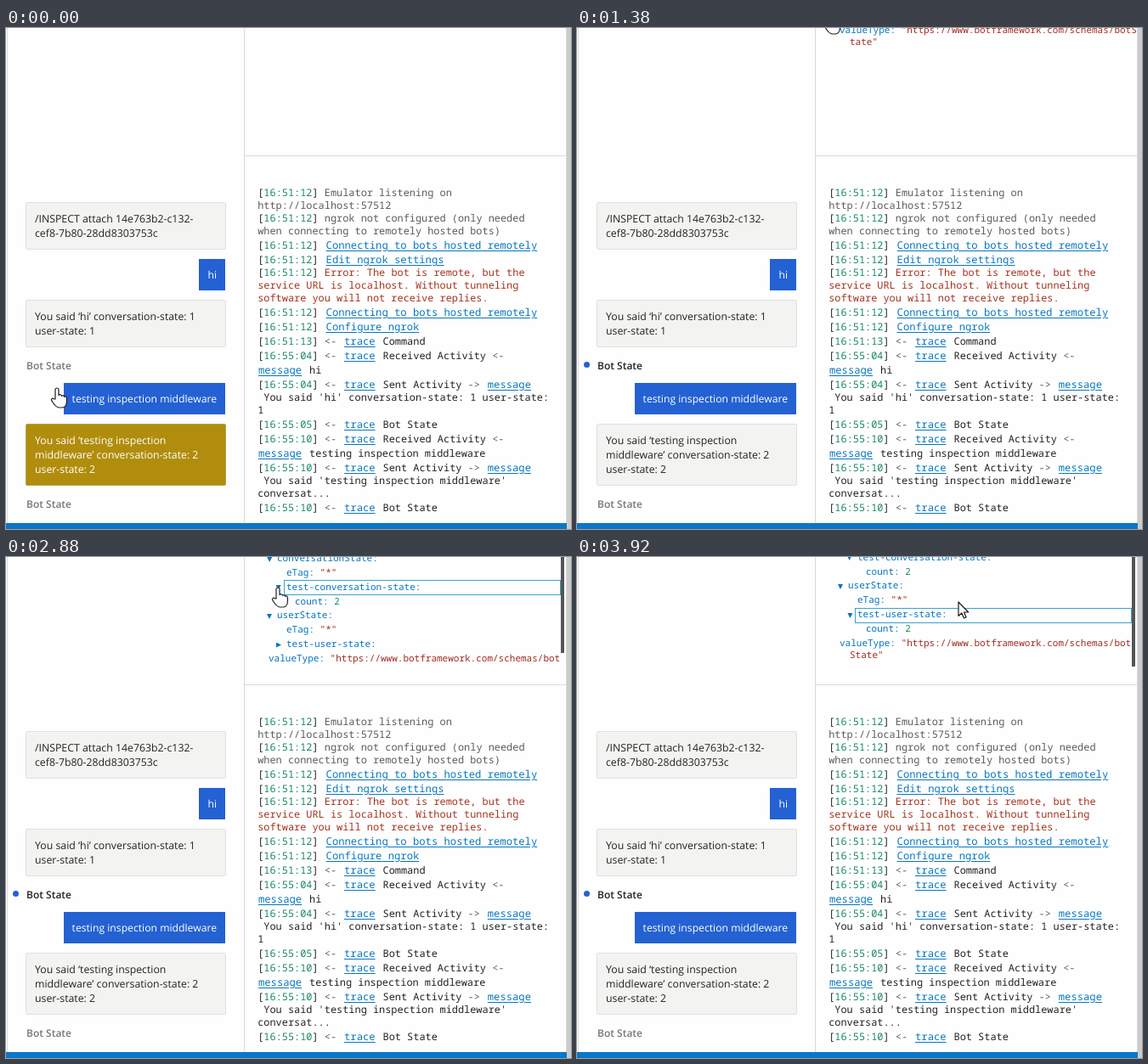
Recreate the animation shown at these times as an HTML page. Size 665 px wide and 590 px high, loop 3970 ms.

```html
<!DOCTYPE html>
<html lang="en">
<head>
<meta charset="utf-8">
<title>Bot inspector</title>
<style>
* { box-sizing: border-box; margin: 0; }
html, body { width: 100%; height: 100%; overflow: hidden; background: #fefefe; }
body {
  --loop: 3.97s step-end infinite;
  --line: #dadada; --ink: #222; --dim: #5c5c5c; --bubble: #f3f3f1;
  --accent: #2461d2; --key: #0574bd; --number: #178a60; --string: #a32a20;
}
#stage {
  position: relative; width: 665px; height: 590px; overflow: hidden;
  background: #fefefe; text-rendering: geometricPrecision;
}
#stage > * { position: absolute; }

/* frame */
.v { width: 1px; top: 0; height: 583px; background: var(--line); }
.h { left: 281px; top: 150px; width: 379px; height: 1px; background: var(--line); }
.edge { left: 660px; top: 0; width: 5px; height: 590px; background: #cbcbcb; }
.bar { left: 0; top: 583px; width: 660px; height: 7px; background: #0877c8; }

/* chat */
.msg, .state { font: 12.3px/17px "Open Sans", "Noto Sans", sans-serif; white-space: pre; color: var(--ink); }
.msg { left: 23px; width: 236px; padding: 10px; border: 1px solid #e0e0e0; border-radius: 2px; background: var(--bubble); }
.me { left: auto; right: 407px; width: auto; color: #fff; background: var(--accent); border: 0; border-radius: 0; font-size: 12.2px; font-weight: 500; }
.gold { animation: gold var(--loop); }
.state { left: 17px; width: 66px; height: 22px; padding: 2px 6px; border: 1px solid transparent; font-size: 12px; font-weight: 600; color: #777; }
.picked { animation: pick var(--loop); }
.dot { left: 8px; top: 393px; width: 7px; height: 7px; border-radius: 50%; background: var(--accent); animation: dot var(--loop); }
@keyframes gold {
  0% { background: #b08d0c; border-color: #b9a04a; color: #fff; }
  11.8%, 100% { background: var(--bubble); border-color: #e0e0e0; color: var(--ink); }
}
@keyframes pick {
  0% { color: #777; border-color: transparent; }
  11.8% { color: var(--ink); border-color: #3aa3cc; }
  31.5%, 100% { color: var(--ink); border-color: transparent; }
}
@keyframes dot { 0% { opacity: 0; } 11.8%, 100% { opacity: 1; } }

/* log */
#log { left: 296.2px; top: 187px; font: 11.92px "Noto Sans Mono", "DejaVu Sans Mono", monospace; color: var(--ink); }
#log p { height: 15px; line-height: 15px; white-space: pre; }
#log p:has(u) { height: 17px; line-height: 17px; }
#log u { font-size: 12.2px; margin: 0 1.8px; color: #0877c0; text-underline-offset: 1.5px; }
#log u:first-child { margin-left: .8px; }
#log b { font-weight: 400; color: var(--number); }
#log s, #log .dim { text-decoration: none; color: var(--dim); }
#log .err { color: #a53420; }

/* property tree */
#panel { left: 281px; top: 0; width: 378px; height: 129px; overflow: hidden; font: 11px/16.8px "Noto Sans Mono", "DejaVu Sans Mono", monospace; color: var(--key); }
#tree { position: absolute; left: 0; top: -5.8px; width: 381px; white-space: pre; animation: appear var(--loop), scroll var(--loop); }
.row { position: relative; height: 16.8px; margin-left: 38px; }
.leaf { margin-left: 49px; }
.deep { margin-left: 59px; }
.row i { position: absolute; left: -12px; top: 5.6px; width: 6px; height: 6px; background: var(--key); clip-path: polygon(0 0, 100% 50%, 0 100%); transform: rotate(var(--turn)); }
.kids { max-height: var(--room); overflow: hidden; }
.node { --room: 200px; --turn: 90deg; }
.value { animation: value var(--loop); }
.user { animation: user var(--loop); }
.conv { animation: conv var(--loop); }
.tconv { animation: tconv var(--loop); }
.tuser { animation: tuser var(--loop); }
.type { padding-left: 40px; text-indent: -12px; line-height: 14px; padding-top: 1.4px; white-space: pre-wrap; word-break: break-all; animation: wrap var(--loop); }
#tree em { font-style: normal; color: var(--string); }
#tree b { font-weight: 400; color: var(--number); }
.focus { position: absolute; height: 18px; border: 1px solid #3aa3cc; animation: focus var(--loop); }
.thumb { position: absolute; left: 372px; top: 0; width: 4px; background: #555; animation: thumb var(--loop); }
@keyframes appear { 0% { opacity: 0; } 11.8%, 100% { opacity: 1; } }
@keyframes value { 0% { --room: 0px; --turn: 0deg; } 37.8%, 100% { --room: 200px; --turn: 90deg; } }
@keyframes user { 0% { --room: 0px; --turn: 0deg; } 47.9%, 100% { --room: 200px; --turn: 90deg; } }
@keyframes conv { 0% { --room: 0px; --turn: 0deg; } 56.4%, 100% { --room: 200px; --turn: 90deg; } }
@keyframes tconv { 0% { --room: 0px; --turn: 0deg; } 68%, 100% { --room: 200px; --turn: 90deg; } }
@keyframes tuser { 0% { --room: 0px; --turn: 0deg; } 79.6%, 100% { --room: 200px; --turn: 90deg; } }
@keyframes wrap { 0% { padding-right: 0; } 56.4%, 100% { padding-right: 7px; } }
@keyframes focus {
  0% { left: 36px; top: -40px; width: 342px; }
  47.9% { left: 36px; top: 15.8px; width: 342px; }
  56.4% { left: 36px; top: -1.2px; width: 336px; }
  68% { left: 46px; top: 32.8px; width: 326px; }
  79.6%, 100% { left: 46px; top: 100.8px; width: 326px; }
}
@keyframes scroll {
  0% { transform: none; }
  91% { transform: none; animation-timing-function: ease-in-out; }
  95%, 100% { transform: translateY(-35px); }
}
@keyframes thumb {
  0% { height: 0; }
  56.4% { height: 129px; }
  68% { height: 113px; }
  79.6% { height: 98px; }
  91% { height: 98px; animation-timing-function: ease-in-out; }
  95%, 100% { height: 129px; }
}

/* pointer */
#pointer { left: 0; top: 0; width: 1px; height: 1px; overflow: visible; fill: #fff; stroke: #1a1a1a; stroke-width: 1.2; stroke-linejoin: round; animation: move 3.97s ease-in-out infinite; }
.hand { animation: hand var(--loop); }
.arrow { animation: arrow var(--loop); }
@keyframes move {
  0%, 2.3% { transform: translate(60px, 424px); }
  10.6%, 30% { transform: translate(55px, 391px); }
  34.2%, 39.3% { transform: translate(298px, -16px); }
  44%, 51.9% { transform: translate(311px, 16px); }
  55.4%, 60.2% { transform: translate(311px, 3px); }
  62%, 63.5% { transform: translate(324px, 23px); }
  66.5%, 72.5% { transform: translate(320px, 36px); }
  78.6%, 88.4% { transform: translate(322px, 104px); }
  98.2%, 100% { transform: translate(449px, 53px); }
}
@keyframes hand {
  0% { opacity: 1; } 31.2% { opacity: 0; } 33.6% { opacity: 1; }
  60.8% { opacity: 0; } 65% { opacity: 1; } 89.7%, 100% { opacity: 0; }
}
@keyframes arrow {
  0% { opacity: 0; } 31.2% { opacity: 1; } 33.6% { opacity: 0; }
  60.8% { opacity: 1; } 65% { opacity: 0; } 89.7%, 100% { opacity: 1; }
}
</style>
</head>
<body>
<div id="stage">
  <div class="v" style="left:1px"></div>
  <div class="v" style="left:280px"></div>
  <div class="v" style="left:659px"></div>
  <div class="h"></div>
  <div class="edge"></div>
  <div class="bar"></div>

  <div class="msg" style="top:205px">/INSPECT attach 14e763b2-c132-
cef8-7b80-28dd8303753c</div>
  <div class="msg me" style="top:272px">hi</div>
  <div class="msg" style="top:320px">You said ‘hi’ conversation-state: 1
user-state: 1</div>
  <div class="dot"></div>
  <div class="state picked" style="top:386px">Bot State</div>
  <div class="msg me" style="top:418px">testing inspection middleware</div>
  <div class="msg gold" style="top:466px">You said ‘testing inspection
middleware’ conversation-state: 2
user-state: 2</div>
  <div class="state" style="top:549px">Bot State</div>

  <div id="log">
    <p>[<b>16:51:12</b>] <s>Emulator listening on</s></p>
    <p class="dim">http://localhost:57512</p>
    <p>[<b>16:51:12</b>] <s>ngrok not configured (only needed</s></p>
    <p class="dim">when connecting to remotely hosted bots)</p>
    <p>[<b>16:51:12</b>] <u>Connecting to bots hosted remotely</u></p>
    <p>[<b>16:51:12</b>] <u>Edit ngrok settings</u></p>
    <p>[<b>16:51:12</b>] <span class="err">Error: The bot is remote, but the</span></p>
    <p class="err">service URL is localhost. Without tunneling</p>
    <p class="err">software you will not receive replies.</p>
    <p>[<b>16:51:12</b>] <u>Connecting to bots hosted remotely</u></p>
    <p>[<b>16:51:12</b>] <u>Configure ngrok</u></p>
    <p>[<b>16:51:13</b>] <s>&lt;-</s> <u>trace</u> Command</p>
    <p>[<b>16:55:04</b>] <s>&lt;-</s> <u>trace</u> Received Activity <s>&lt;-</s></p>
    <p><u>message</u> hi</p>
    <p>[<b>16:55:04</b>] <s>&lt;-</s> <u>trace</u> Sent Activity <s>-&gt;</s> <u>message</u></p>
    <p> You said 'hi' conversation-state: 1 user-state:</p>
    <p>1</p>
    <p>[<b>16:55:05</b>] <s>&lt;-</s> <u>trace</u> Bot State</p>
    <p>[<b>16:55:10</b>] <s>&lt;-</s> <u>trace</u> Received Activity <s>&lt;-</s></p>
    <p><u>message</u> testing inspection middleware</p>
    <p>[<b>16:55:10</b>] <s>&lt;-</s> <u>trace</u> Sent Activity <s>-&gt;</s> <u>message</u></p>
    <p> You said 'testing inspection middleware'</p>
    <p>conversat...</p>
    <p>[<b>16:55:10</b>] <s>&lt;-</s> <u>trace</u> Bot State</p>
  </div>

  <div id="panel">
    <div id="tree"><div class="node value"><div class="kids"
      ><div class="node conv"><div class="row"><i></i>conversationState:</div><div class="kids"
        ><div class="row leaf">eTag: <em>"*"</em></div
        ><div class="node tconv"><div class="row leaf"><i></i>test-conversation-state:</div><div class="kids"
          ><div class="row deep">count: <b>2</b></div></div></div></div></div
      ><div class="node user"><div class="row"><i></i>userState:</div><div class="kids"
        ><div class="row leaf">eTag: <em>"*"</em></div
        ><div class="node tuser"><div class="row leaf"><i></i>test-user-state:</div><div class="kids"
          ><div class="row deep">count: <b>2</b></div></div></div></div></div
      ></div></div
      ><div class="type">valueType: <em>"https://www.botframework.com/schemas/botState"</em></div
      ><div class="focus"></div></div>
    <div class="thumb"></div>
  </div>

  <svg id="pointer">
    <path class="hand" d="M-2 13V2a2 2 0 0 1 4 0v6.5a1.9 1.9 0 0 1 3.4.8 1.9 1.9 0 0 1 3.2 1 1.7 1.7 0 0 1 2.8 1.5V16c0 4-2 7-5.4 7H2.5C-1.5 23-4 18.5-6.4 14.6c-.8-2 1.2-3.2 2.9-1.8z"/>
    <path class="arrow" d="M0 0V16.5L3.8 13 6.4 19 9 17.9 6.5 12H11.7Z"/>
  </svg>
</div>
</body>
</html>
```
